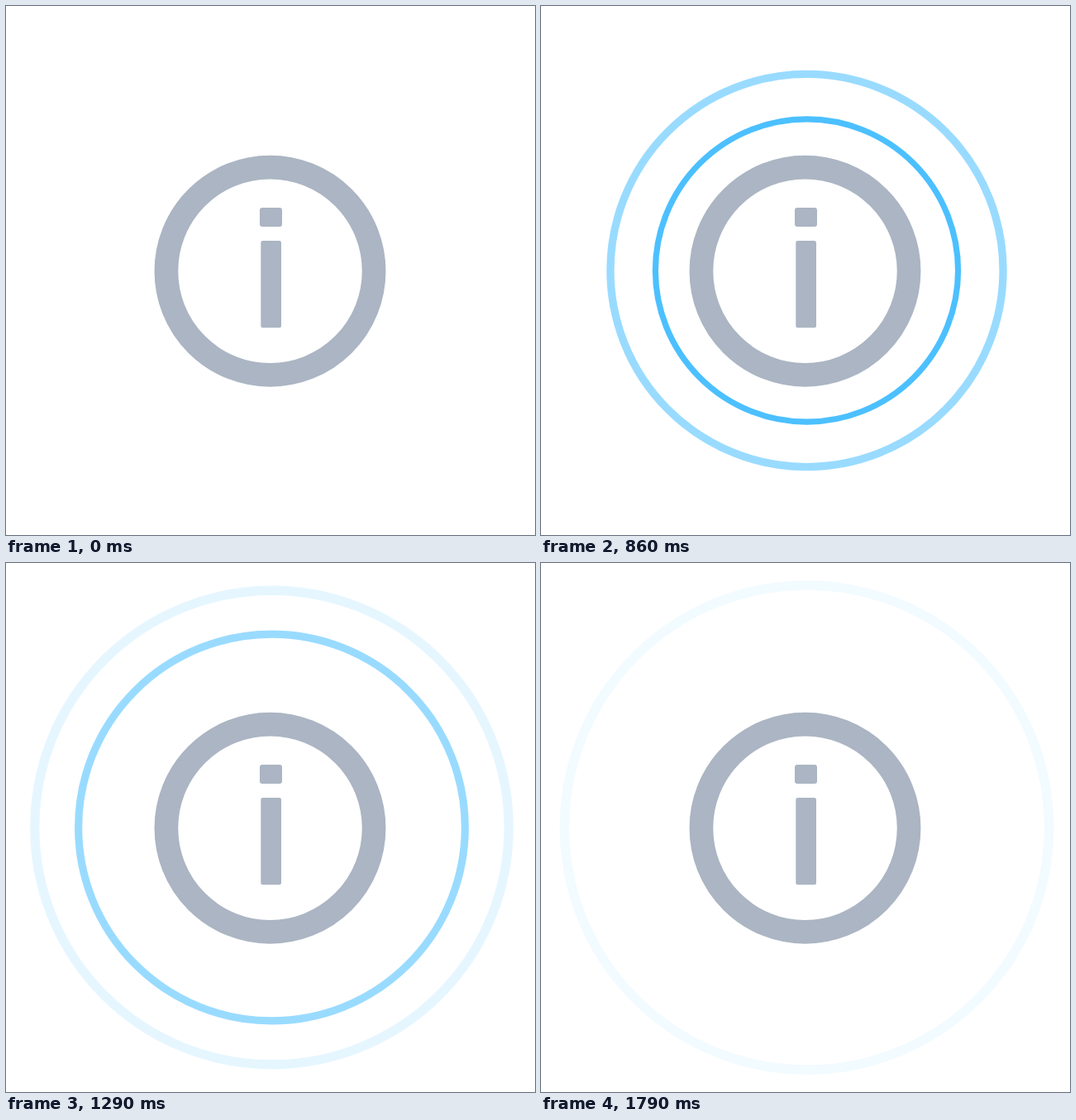
Write an HTML page that moves like this. It is 640 px wide and 640 px high and loops after 1870 ms.

```html
<!DOCTYPE html>
<html lang="en">
<head>
<meta charset="utf-8">
<title>Info pulse</title>
<style>
  html, body { margin: 0; height: 100%; overflow: hidden; background: #fff; }
  svg { display: block; width: 100vw; height: 100vh; }
</style>
</head>
<body>
<svg viewBox="0 0 640 640">
  <g fill="none" stroke="#00a5ff">
    <circle class="ring" cx="321.5" cy="320"/>
    <circle class="ring" cx="321.5" cy="320"/>
  </g>
  <circle cx="319.5" cy="320.7" r="125.6" fill="none" stroke="#abb5c3" stroke-width="28.7"/>
  <g fill="#abb5c3">
    <rect x="307" y="244" width="27" height="23" rx="3"/>
    <rect x="308.3" y="284" width="24.7" height="105.3" rx="2.5"/>
  </g>
</svg>
<script>
  const LOOP = 1870, FPS = 14, LAST_STEP = 25, LIFE = 20;

  // Outer radius grows linearly while the ring fades out.
  const rings = [
    { start: 0, radius: 141.9, growth: 8.36 },
    { start: 6, radius: 134.9, growth: 8.63 }
  ];
  const circles = document.querySelectorAll('.ring');

  function draw() {
    const time = performance.now() % LOOP;
    const rounded = Math.floor(time / 10) * 10 + 5;
    const step = Math.min(LAST_STEP, Math.floor(rounded * FPS / 1000));

    rings.forEach(({ start, radius, growth }, i) => {
      const age = step - start;
      const outer = radius + growth * Math.max(0, age);
      const width = outer * 0.0385;
      const circle = circles[i];
      circle.setAttribute('r', outer - width / 2);
      circle.setAttribute('stroke-width', width);
      circle.setAttribute('opacity', age > 0 ? Math.max(0, 1 - age / LIFE) : 0);
    });
    requestAnimationFrame(draw);
  }
  draw();
</script>
</body>
</html>
```
